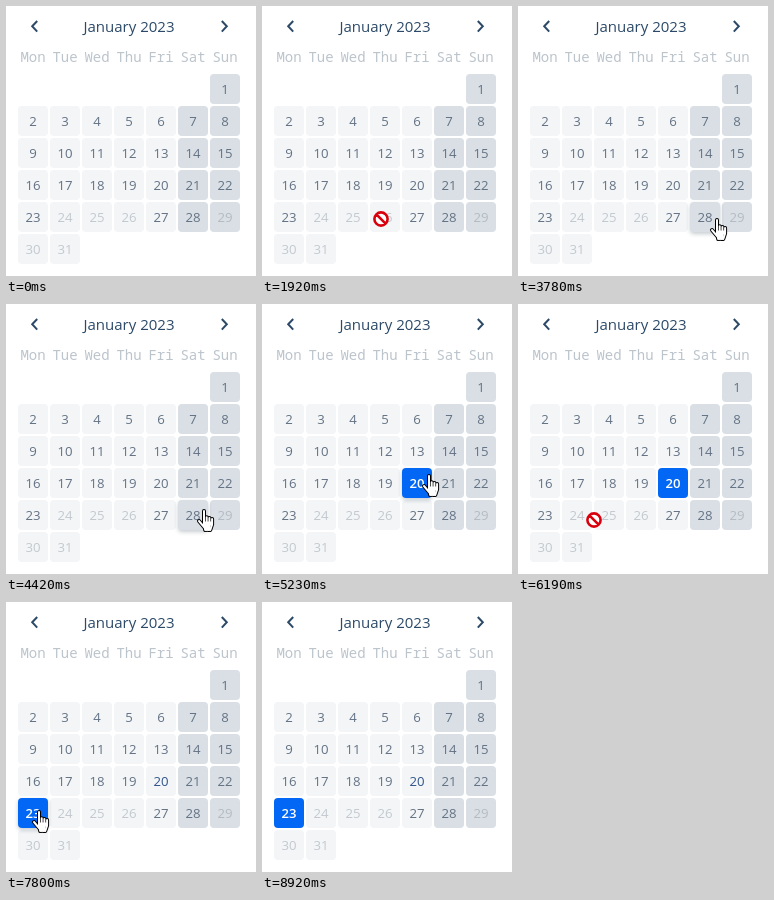
An HTML page with a canvas that plays this animation: 250x270 px, repeating every 9.59 s.

```html
<!DOCTYPE html>
<html lang="en">
<head>
<meta charset="utf-8">
<title>Calendar</title>
<style>
html, body { margin: 0; width: 100%; height: 100%; overflow: hidden; background: #fff; }
#cal { position: absolute; left: 0; top: 0; width: 250px; height: 270px; font: 13.2px/30px "Open Sans", "Noto Sans", sans-serif; }
#cal div { position: absolute; text-align: center; white-space: nowrap; }
#cal .title { left: 23px; top: 5px; width: 200px; font-size: 15px; color: #2c4a68; }
#cal .name { width: 40px; top: 36px; font: 300 14px/30px "Noto Sans Mono", monospace; color: #bcc4cc; }
#cal .day { width: 30px; height: 30px; border-radius: 4px; background: #f3f5f7; color: #637284; }
#cal .end { background: #d9dfe4; }
#cal .off { color: #c3c9cf; }
#cal .end.off { color: #b3bbc3; }
#cal .past { color: #33558a; }
#cal .hover { z-index: 1; box-shadow: 0 2px 4px rgba(20, 40, 60, .24); }
#cal .pick { position: absolute; inset: 0; border-radius: 4px; background: #0367f5; color: #fff; font-weight: 600; opacity: 0; }
canvas { position: absolute; left: 0; top: 0; width: 250px; height: 270px; z-index: 2; }
</style>
</head>
<body>
<div id="cal"></div>
<canvas id="view" width="250" height="270"></canvas>
<script>
const LOOP = 9590, SIZE = 30, STEP = 32, LEFT = 12, TOP = 68;
const cal = document.getElementById('cal');
const ctx = document.getElementById('view').getContext('2d');
const closed = new Set([24, 25, 26, 29, 30, 31]);

const ramp = (t, from, to) => Math.min(1, Math.max(0, (t - from) / (to - from)));
const smooth = u => u * u * (3 - 2 * u);
const out = u => 1 - (1 - u) * (1 - u);

function add(parent, cls, text) {
  const el = document.createElement('div');
  el.className = cls;
  el.textContent = text;
  parent.appendChild(el);
  return el;
}

add(cal, 'title', 'January 2023');
'Mon Tue Wed Thu Fri Sat Sun'.split(' ').forEach((name, i) => {
  add(cal, 'name', name).style.left = 7 + i * STEP + 'px';
});

const days = Array.from({ length: 31 }, (_, i) => {
  const n = i + 1, col = (i + 6) % 7, row = Math.floor((i + 6) / 7);
  const x = LEFT + col * STEP, y = TOP + row * STEP;
  const off = closed.has(n);
  const el = add(cal, 'day' + (col > 4 ? ' end' : '') + (off ? ' off' : ''), n);
  el.style.left = x + 'px';
  el.style.top = y + 'px';
  return { x, y, off, el, pick: add(el, 'pick', n) };
});

// each move: start, end, where to, sag of the path, easing
const enter = { x: 168, y: 271 };
const moves = [
  { from: 1400, to: 1910, x: 119, y: 213, sag: 0, ease: smooth },
  { from: 2330, to: 2500, x: 121, y: 184, sag: 0, ease: smooth },
  { from: 2950, to: 3200, x: 149, y: 177, sag: 0, ease: out },
  { from: 3400, to: 3980, x: 216, y: 215, sag: 10, ease: smooth },
  { from: 4330, to: 4750, x: 166, y: 171, sag: 13, ease: out },
  { from: 5570, to: 6520, x: 41, y: 224, sag: 7, ease: smooth },
  { from: 6800, to: 7120, x: 34, y: 243, sag: 0, ease: smooth },
  { from: 7500, to: 7720, x: 32, y: 209, sag: 0, ease: smooth },
  { from: 7840, to: 8290, x: 76, y: 221, sag: 30, ease: smooth },
  { from: 8630, to: 8920, x: 127, y: 272, sag: 0, ease: smooth }
];

function pointer(t) {
  let { x, y } = enter;
  for (const m of moves) {
    const u = ramp(t, m.from, m.to), k = m.ease(u);
    x += (m.x - x) * k;
    y += (m.y - y) * k + m.sag * Math.sin(Math.PI * u);
  }
  return { x: Math.round(x), y: Math.round(y) };
}

function drawHand() {
  ctx.translate(-6, -1);
  ctx.lineCap = ctx.lineJoin = 'round';
  ctx.beginPath();
  for (let i = 0; i < 4; i++) {
    const x = 7 + 2.7 * i;
    ctx.moveTo(x, i ? 7.5 + 0.8 * i : 2);
    ctx.lineTo(x, 15.5);
    ctx.lineTo(8.2 + 1.7 * i, 21);
  }
  ctx.moveTo(2, 12);
  ctx.lineTo(7, 18);
  for (const [color, width] of [['#000', 4], ['#fff', 2]]) {
    ctx.strokeStyle = color;
    ctx.lineWidth = width;
    ctx.stroke();
  }
  ctx.fillStyle = '#fff';
  ctx.fillRect(6.5, 12.5, 9, 4);
  ctx.fillRect(8, 15, 5.5, 6.5);
}

function drawBan() {
  ctx.beginPath();
  ctx.arc(0, 0, 6.6, 0, Math.PI * 2);
  ctx.fillStyle = '#fff';
  ctx.fill();
  ctx.moveTo(-4.6, -4.6);
  ctx.lineTo(4.6, 4.6);
  ctx.strokeStyle = '#d9000d';
  ctx.lineWidth = 2.6;
  ctx.stroke();
}

const arrow = new Path2D('M.5.5V16.3L4.2 12.8L6.6 18.4L9 17.4L6.6 11.9H11.7Z');

function drawArrow() {
  ctx.fillStyle = '#fff';
  ctx.strokeStyle = '#000';
  ctx.lineWidth = 1;
  ctx.fill(arrow);
  ctx.stroke(arrow);
}

function chevron(x, dir) {
  ctx.beginPath();
  ctx.moveTo(x + 2.5 * dir, 15);
  ctx.lineTo(x - 2.5 * dir, 20.3);
  ctx.lineTo(x + 2.5 * dir, 25.6);
  ctx.strokeStyle = '#2c4a68';
  ctx.lineWidth = 2;
  ctx.stroke();
}

function draw(t) {
  const p = pointer(t), shown = t >= moves[0].from && t < moves.at(-1).to;
  const inside = d => p.x >= d.x && p.x <= d.x + SIZE && p.y >= d.y && p.y <= d.y + SIZE;
  const over = shown && days.find(inside);
  for (const d of days) d.el.classList.toggle('hover', d === over && !d.off);

  const first = days[19], second = days[22], swap = ramp(t, 7720, 7790);
  first.pick.style.opacity = ramp(t, 5100, 5230) * (1 - swap);
  first.el.classList.toggle('past', swap > 0);
  second.pick.style.opacity = swap;

  ctx.clearRect(0, 0, 250, 270);
  ctx.save();
  chevron(28.7, 1);
  chevron(218.3, -1);
  if (shown) {
    ctx.translate(p.x, p.y);
    if (!over) drawArrow();
    else if (over.off) drawBan();
    else drawHand();
  }
  ctx.restore();
}

const start = performance.now();
function frame() {
  draw((performance.now() - start) % LOOP);
  requestAnimationFrame(frame);
}
frame();
</script>
</body>
</html>
```
